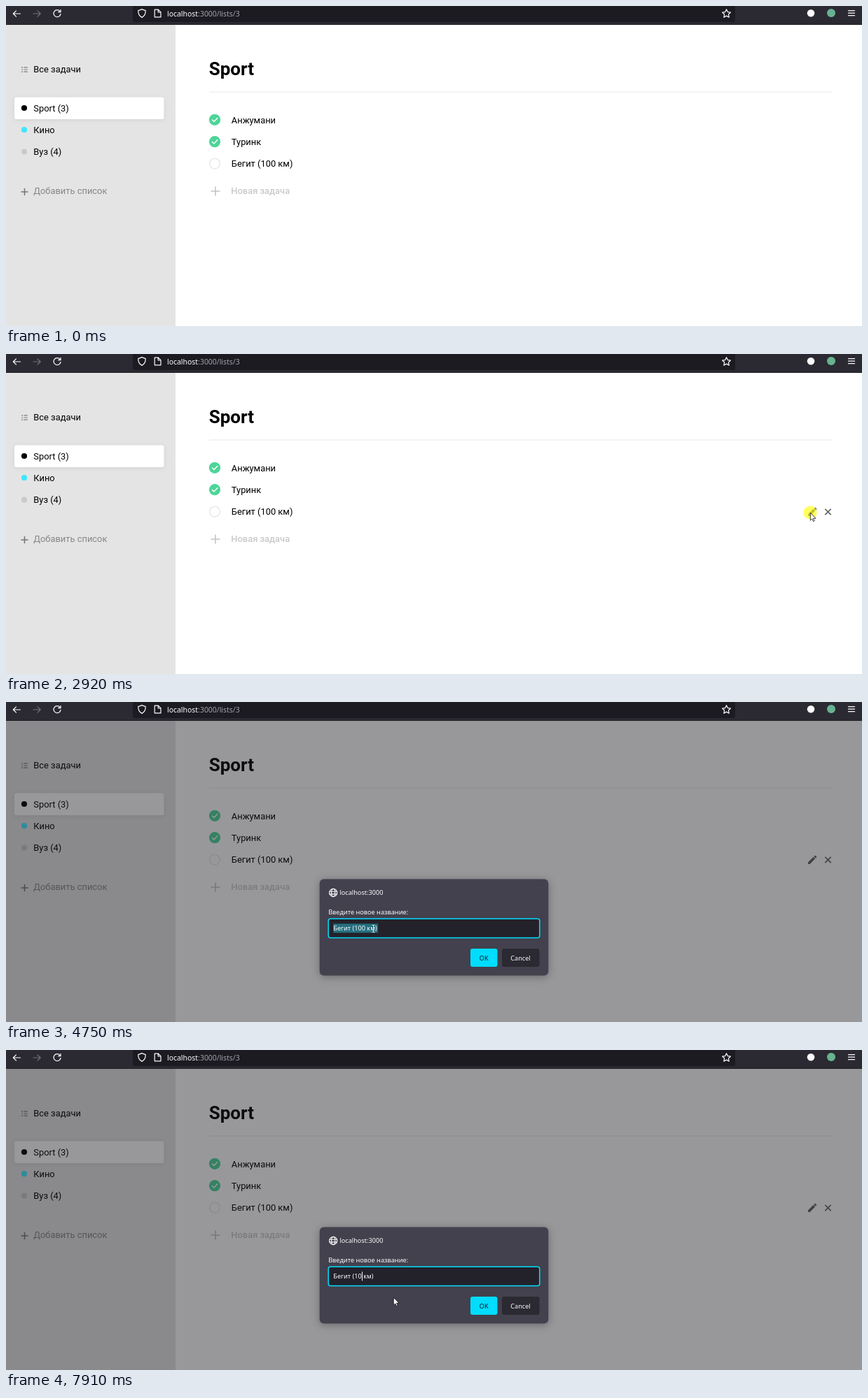
Recreate the animation shown at these times as an HTML page. Size 1222 px wide and 458 px high, loop 8000 ms.

```html
<!DOCTYPE html>
<html lang="ru">
<head>
<meta charset="utf-8">
<title>Sport</title>
<style>
  html, body { margin: 0; width: 100%; height: 100%; overflow: hidden; background: #fff; }
  svg { display: block; width: 1222px; height: 458px; }
  text { white-space: pre; }
  .app { font: 12.9px Roboto, sans-serif; fill: #000; }
  .title { font-size: 26px; font-weight: 700; }
  .ui { font: 9.15px "Noto Sans", "Open Sans", sans-serif; fill: #fbfbfe; }
  .url { font-size: 10.45px; }
  .line { fill: none; stroke-linecap: round; stroke-linejoin: round; }
  .dialog { filter: drop-shadow(0 2px 6px rgba(0, 0, 0, .3)); }
  .card { filter: drop-shadow(0 1px 3px rgba(0, 0, 0, .08)); }
</style>
</head>
<body>
<svg viewBox="0 0 1222 458">
  <defs>
    <g id="done">
      <circle r="8.1" fill="#4dd599"/>
      <path class="line" d="M-3.6 .2L-1.1 2.7L3.7-2.4" stroke="#fff" stroke-width="1.4"/>
    </g>
  </defs>

  <!-- browser bar -->
  <rect width="1222" height="27" fill="#2b2a33"/>
  <rect y="26" width="1222" height="1" fill="#1f1e25"/>
  <rect x="181" y="-5" width="860" height="28" rx="3" fill="#1c1b22"/>
  <g class="line" stroke="#fbfbfe" stroke-width="1.2">
    <path d="M20.5 11H10.5M14.5 6.8L10.3 11L14.5 15.2"/>
    <path d="M39 11H49M45 6.8L49.2 11L45 15.2" stroke="#73727a"/>
    <path d="M77 7.6A5 5 0 1 0 78 11.4M78 5.4V8.6H74.6"/>
    <path d="M194 4.6L199.2 6.6C199.4 11.6 197.6 14.6 194 16.4C190.4 14.6 188.6 11.6 188.8 6.6Z"/>
    <path d="M212.2 5.2H217.4L221 8.8V15.8H212.2ZM217.2 5.4V9H220.8"/>
    <path d="M1028.5 4.8L1030.3 8.6L1034.4 9.1L1031.4 12L1032.2 16.1L1028.5 14.1L1024.8 16.1L1025.6 12L1022.6 9.1L1026.7 8.6Z"/>
    <path d="M1202.5 6.7H1211.5M1202.5 10.2H1211.5M1202.5 13.7H1211.5"/>
  </g>
  <circle cx="1149" cy="10.3" r="5.3" fill="#fbfbfe"/>
  <circle cx="1178" cy="10" r="6" fill="#67b28f"/>
  <text class="ui url" x="230" y="15">localhost<tspan fill="#a3a2a9">:3000/lists/3</tspan></text>

  <!-- sidebar -->
  <rect y="27" width="242" height="431" fill="#e4e4e4"/>
  <path d="M22 87.8h2m1.4 0h5.4M22 91h2m1.4 0h5.4M22 94.2h2m1.4 0h5.4" stroke="#7c7c7c" stroke-width="1.2"/>
  <rect class="card" x="12" y="130.5" width="213.5" height="31.5" rx="3" fill="#fff"/>
  <circle cx="26" cy="146" r="4.1"/>
  <circle cx="26" cy="177.2" r="4.1" fill="#42e6ff"/>
  <circle cx="26" cy="208.7" r="4.1" fill="#c9cacb"/>
  <path class="line" d="M22 266H31M26.5 261.5V270.5" stroke="#767676" stroke-width="1.6"/>
  <g class="app">
    <text x="39.3" y="95.3">Все задачи</text>
    <text x="39.3" y="150.5">Sport (3)</text>
    <text x="39.3" y="182">Кино</text>
    <text x="39.3" y="213.3">Вуз (4)</text>
    <text x="39.3" y="269" fill="#868686">Добавить список</text>
  </g>

  <!-- tasks -->
  <rect x="290" y="122.2" width="889" height="1.6" fill="#f0f0f0"/>
  <use href="#done" x="298" y="162.8"/>
  <use href="#done" x="298" y="194.2"/>
  <circle cx="298" cy="225.6" r="7.4" fill="#fff" stroke="#e8e8e8" stroke-width="1.5"/>
  <path class="line" d="M293 265H305M299 259V271" stroke="#c4c4c4" stroke-width="1.6"/>
  <g class="app">
    <text class="title" x="289.7" y="99.3">Sport</text>
    <text x="321.8" y="167.6">Анжумани</text>
    <text x="321.8" y="199">Туринк</text>
    <text x="321.8" y="230.4">Бегит (100 км)</text>
    <text x="321.3" y="269.4" fill="#c9c9c9" font-weight="500">Новая задача</text>
  </g>
  <g id="tools">
    <path transform="translate(1143 217.6) scale(.68)" fill="#5f5f5f" d="M3 17.25V21h3.75L17.81 9.94l-3.75-3.75zM20.71 7.04c.39-.39.39-1.02 0-1.41l-2.34-2.34c-.39-.39-1.02-.39-1.41 0l-1.83 1.83 3.75 3.75z"/>
    <path d="M1169.3 221.7L1177.7 230.1M1177.7 221.7L1169.3 230.1" stroke="#5f5f5f" stroke-width="1.6"/>
  </g>

  <!-- prompt -->
  <g id="prompt">
    <rect y="27" width="1222" height="431" fill="#1c1b22" opacity=".45"/>
    <rect class="dialog" x="447.7" y="253.5" width="326.6" height="138" rx="6" fill="#42414d"/>
    <g class="line" stroke="#fbfbfe" stroke-width="1.1">
      <circle cx="467.2" cy="273" r="5.6"/>
      <ellipse cx="467.2" cy="273" rx="2.6" ry="5.6"/>
      <path d="M461.8 271.2H472.6M461.8 274.9H472.6"/>
    </g>
    <rect x="460.2" y="310.2" width="301.6" height="27.2" rx="3" fill="#23222b" stroke="#00ddff" stroke-width="1.5"/>
    <rect id="selection" x="467.3" y="317.3" width="63.6" height="13" fill="#25707f"/>
    <rect x="663" y="353" width="38.5" height="26" rx="3" fill="#00ddff"/>
    <rect x="708" y="353" width="53.5" height="26" rx="3" fill="#2b2a33"/>
    <g class="ui">
      <text x="476.5" y="276.4" font-weight="500">localhost:3000</text>
      <text x="460.2" y="304.3">Введите новое название:</text>
      <text id="value" x="467.3" y="327.4"></text>
      <text x="682.2" y="369.7" text-anchor="middle" style="fill:#15141a">OK</text>
      <text x="734.5" y="369.7" text-anchor="middle">Cancel</text>
    </g>
    <rect id="caret" y="317.3" width="1" height="13" fill="#fbfbfe"/>
  </g>

  <circle id="click" r="9.6" fill="#ff0" opacity=".62"/>
  <g id="cursor">
    <path id="arrow" d="M.3 .3V11.2L2.8 8.9L4.5 12.6L6.2 11.8L4.5 8.2H8Z" fill="#fff" stroke="#111" stroke-width=".8" stroke-linejoin="round"/>
    <path id="beam" d="M-2-5H2M0-5V5M-2 5H2" stroke="#d8d8de" stroke-width="1" fill="none"/>
  </g>
</svg>
<script>
const LOOP = 8000, STEP = 67.5;
const linear = p => p;
const smooth = p => p * p * (3 - 2 * p);
const easeOut = p => 1 - (1 - p) ** 2.2;
const launch = p => p ** .88;

// pointer legs: start ms, steps, end point, easing, optional bend point
const start = [1148, 453];
const legs = [
  [130, 12, [451, 253], smooth, [560, 410]],
  [950, 12, [903, 232], launch, [470, 228]],
  [1770, 9, [1142, 231], easeOut],
  [2510, 2, [1148, 227], linear],
  [3450, 12, [553, 307], smooth],
  [4270, 3, [522, 323], linear],
  [4610, 2, [524.5, 324.5], linear],
  [4820, 2, [522, 324.5], linear],
  [5360, 5, [513, 324.5], smooth],
  [5820, 7, [553, 354], smooth]
];
const clicks = [[2850, 2990], [4950, 5160], [5700, 5820]];
// caret: from ms, to ms, x
const carets = [
  [4950, 5480, 519], [5700, 6230, 513], [6760, 7290, 513],
  [7840, 7910, 513], [7910, LOOP, 508]
];

const el = id => document.getElementById(id);
const [tools, prompt, selection, value, caret, click, cursor, arrow, beam] =
  ["tools", "prompt", "selection", "value", "caret", "click", "cursor", "arrow", "beam"].map(el);
const show = (node, on) => { node.style.display = on ? "" : "none"; };
const place = (node, [x, y]) => node.setAttribute("transform", `translate(${x} ${y})`);
const during = t => ([a, b]) => t >= a && t < b;

function pointer(t) {
  let pos = start;
  for (const [at, steps, end, ease, bend] of legs) {
    if (t < at) break;
    const u = ease(Math.min(1, (Math.floor((t - at) / STEP) + 1) / steps));
    pos = pos.map((a, i) => {
      const c = bend ? bend[i] : (a + end[i]) / 2;
      return (1 - u) ** 2 * a + 2 * u * (1 - u) * c + u * u * end[i];
    });
  }
  return pos;
}

function draw(t) {
  const pos = pointer(t), [x, y] = pos;
  const open = t >= 2990;
  const typing = open && x > 460 && x < 762 && y > 310 && y < 338;

  show(cursor, t >= 130);
  show(arrow, !typing);
  show(beam, typing);
  place(cursor, pos);

  show(click, clicks.some(during(t)));
  place(click, pos);

  show(tools, open || (t >= 950 && y < 241));
  show(prompt, open);
  show(selection, t < 4950);
  value.textContent = t < 7910 ? "Бегит (100 км)" : "Бегит (10 км)";

  const mark = carets.find(during(t));
  show(caret, mark);
  if (mark) caret.setAttribute("x", mark[2]);
}

function tick() {
  draw(performance.now() % LOOP);
  requestAnimationFrame(tick);
}
tick();
</script>
</body>
</html>
```
